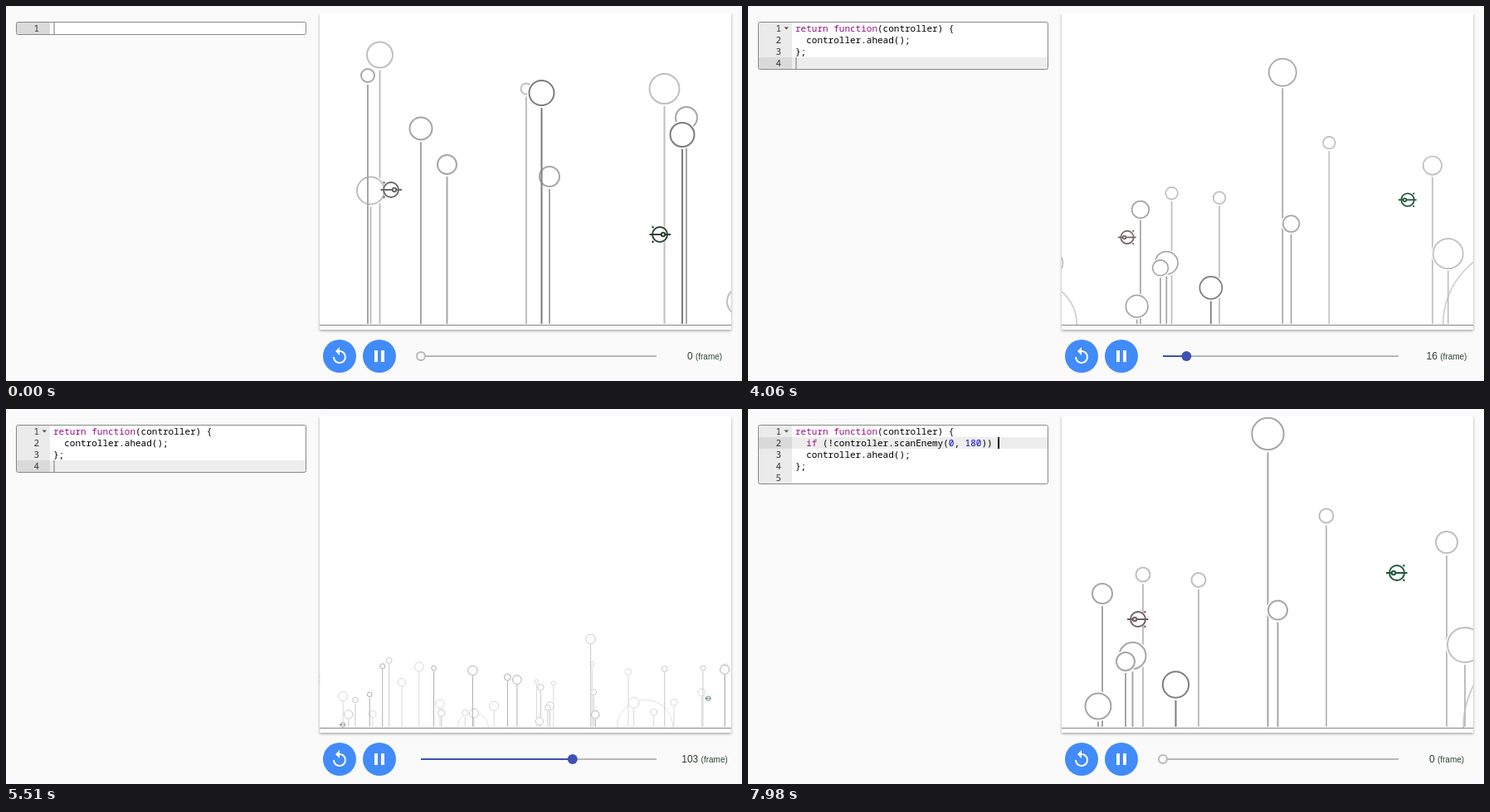
Recreate the animation shown at these times as an HTML page with a canvas. Size 887 px wide and 453 px high, loop 8000 ms.

```html
<!DOCTYPE html>
<html lang="en">
<head>
<meta charset="utf-8">
<title>Code battle</title>
<style>
  html, body { margin: 0; width: 100%; height: 100%; overflow: hidden; background: #fafafa; }
  canvas { display: block; }
</style>
</head>
<body>
<canvas id="stage" width="887" height="453"></canvas>
<script>
const ctx = document.getElementById('stage').getContext('2d');
const LOOP = 8000, SWITCH = 3410, PLAY = 3778, END = 6445;
const MONO = '11px "Noto Sans Mono", monospace';
const FIELD = { x: 378, y: 8, w: 496, h: 383, centre: 626, ground: 385 };
const ICONS = {
  replay: new Path2D('M12 5V1L7 6l5 5V7c3.31 0 6 2.69 6 6s-2.69 6-6 6-6-2.69-6-6H4c0 4.42 3.58 8 8 8s8-3.58 8-8-3.58-8-8-8z'),
  pause: new Path2D('M6 19h4V5H6v14zm8-14v14h4V5h-4z'),
  play: new Path2D('M8 5v14l11-7z')
};

// Parallax layers, back to front
const LAYERS = [
  { depth: 1 / 4, colour: '#bfbfbf', gap: 105 },
  { depth: 1 / 3, colour: '#a6a6a6', gap: 135 },
  { depth: 1 / 2, colour: '#7c7c7c', gap: 130 }
];

// Trees of the opening views, per layer: [x, height, radius]
const firstForest = {
  domes: [],
  trees: [
    [[450.5, 326, 16.5], [439.5, 162, 17.5], [627, 285, 7.5], [793.5, 285, 19], [886, 28, 18]],
    [[436, 301, 9], [500, 237, 14.5], [531.5, 193.5, 12.5], [655, 179, 13], [820, 250, 14]],
    [[645.5, 280, 16], [815, 229.5, 15.5]]
  ]
};
const secondForest = {
  domes: [[286, 62], [974, 112]],
  trees: [
    [[697, 256, 9.5], [842, 224, 14], [476, 185, 9.5], [543, 178.5, 9.5], [864, 100, 22]],
    [[626.5, 355, 20.2], [427, 162, 13], [638.5, 142, 12.5], [463.5, 87, 17], [455, 80, 12], [422, 26, 16.5]],
    [[515.5, 52, 16.7]]
  ]
};

let seed = 7;
function random() {
  seed = seed * 16807 % 2147483647;
  return seed / 2147483647;
}

// Trees beyond the opening view, revealed as the camera zooms out
secondForest.trees.forEach((trees, i) => {
  const { gap } = LAYERS[i];
  for (let start = -1000; start < 1350; start += gap) {
    const x = start + gap * random();
    const height = 40 + 230 * random() ** 1.3, radius = 10 + 10 * random();
    if (x < 310 || x > 920) trees.push([x, height, radius]);
  }
});

// Flight rules by tick: half the distance between ships, camera travel, altitudes
const spreadAt = n => 156 + 6.5 * (n - 14.6 * (1 - Math.exp(-n / 14.6)));
const cameraAt = n => n * (7.6 - 4.2 * Math.exp(-((n / 45) ** 2)));
const diveAt = n => Math.max(12, 131 - .0316 * n * n);
const glideAt = n => 117 + 70 * Math.exp(-((n / 38) ** 2));

// Keystrokes with [time, number of keys pressed]
const KEYS = 'return function(controller) {\ncontroller.ahead();↓;\n'
  + '↑↑↑\nif (!controller.scanEnemy(0, 180)) ';
const pace = [[0, 0], [870, 1], [1860, 27], [2990, 52], [6500, 53], [7080, 61], [7980, 91], [LOOP, 91]];

function keysAt(t) {
  const i = pace.findIndex(p => p[0] > t);
  const [t0, n0] = pace[i - 1], [t1, n1] = pace[i];
  return Math.floor(n0 + (n1 - n0) * (t - t0) / (t1 - t0));
}

// Small editor with bracket closing and auto indent
function typeKeys(count) {
  let before = '', after = '';
  for (const key of KEYS.slice(0, count)) {
    if (key === '↓') {
      before += after;
      after = '';
    } else if (key === '↑') {
      const cut = before.lastIndexOf('\n');
      after = before.slice(cut) + after;
      before = before.slice(0, cut);
    } else if (key === '\n') {
      const opened = before.endsWith('{');
      if (opened && after[0] === '}') after = '\n' + after;
      before += opened ? '\n  ' : '\n';
    } else if (key === ')' && after[0] === ')') {
      before += key;
      after = after.slice(1);
    } else {
      before += key;
      if (key === '(') after = ')' + after;
      if (key === '{') after = '}' + after;
    }
  }
  return { before, after };
}

function rect(x, y, w, h, colour) {
  ctx.fillStyle = colour;
  ctx.fillRect(x, y, w, h);
}

function line(x1, y1, x2, y2) {
  ctx.beginPath();
  ctx.moveTo(x1, y1);
  ctx.lineTo(x2, y2);
  ctx.stroke();
}

function disc(x, y, r, colour) {
  ctx.beginPath();
  ctx.arc(x, y, r, 0, 7);
  ctx.fillStyle = colour;
  ctx.fill();
}

function ring(x, y, r, from = 0) {
  ctx.beginPath();
  ctx.arc(x, y, r, from, 2 * Math.PI);
  ctx.stroke();
}

function text(str, x, y, colour, font, align = 'left') {
  ctx.fillStyle = colour;
  ctx.font = font;
  ctx.textAlign = align;
  ctx.fillText(str, x, y);
}

function drawCode(str, y, cell) {
  for (const m of str.matchAll(/\w+|[^\w\s]+/g)) {
    const colour = /^(return|function|if)$/.test(m[0]) ? '#930f80'
      : /^\d/.test(m[0]) ? '#0000cd' : '#000';
    text(m[0], 57 + m.index * cell, y, colour, MONO);
  }
}

function drawEditor(t) {
  const { before, after } = typeKeys(keysAt(t));
  const lines = (before + after).split('\n');
  const head = before.split('\n');
  const row = head.length - 1;
  const height = 14 * lines.length;
  const focused = t >= 680 && t < SWITCH || t >= 6500;
  ctx.font = MONO;
  const cell = ctx.measureText('0').width;

  rect(13, 20, 348, height, '#fff');
  rect(13, 20, 40, height, '#ebebeb');
  rect(13, 20 + 14 * row, 40, 14, '#dadada');
  if (lines.length > 1) rect(53, 20 + 14 * row, 308, 14, '#ededed');
  lines.forEach((str, i) => {
    const y = 31 + 14 * i;
    text(i + 1, 40, y, '#333', MONO, 'right');
    drawCode(str, y, cell);
  });
  if (lines.length === 1 && t >= 1400) {
    text('i', 21, 31, '#333', 'italic bold 11px "Liberation Serif", serif');
  }
  if (lines.length > 1) {
    ctx.fillStyle = '#555';
    ctx.fill(new Path2D('M43.5 25.5h5.5l-2.75 3z'));
  }
  const x = Math.floor(57 + head[row].length * cell);
  if (focused) rect(x, 20 + 14 * row, 2, 14, '#000');
  else rect(x + .5, 20 + 14 * row, 1, 14, '#777');

  ctx.strokeStyle = '#888';
  ctx.lineWidth = 1;
  ctx.beginPath();
  ctx.roundRect(12.5, 19.5, 349, height + 1, 2);
  ctx.stroke();
}

function drawShip(x, y, face, scale, colour) {
  ctx.save();
  ctx.translate(x, y);
  ctx.scale(face * scale, scale);
  disc(0, 0, 10, '#fff');
  ctx.strokeStyle = colour;
  ctx.lineWidth = 2;
  ring(0, 0, 9);
  ring(4, 0, 2.2);
  line(-12.5, 0, 1.5, 0);
  line(6.5, 0, 13, 0);
  line(-7.5, -8, -9.3, -9.8);
  line(-7.5, 8, -9.3, 9.8);
  ctx.restore();
}

function drawField({ domes, trees }, { scale, camera, spread, heights, face, inks }) {
  const { x, y, w, h, centre, ground } = FIELD;
  const project = (px, depth) => centre + scale * (px - centre + camera * depth);
  ctx.save();
  ctx.shadowColor = 'rgba(0,0,0,.35)';
  ctx.shadowBlur = 3;
  ctx.shadowOffsetY = 1.5;
  rect(x, y, w, h, '#fff');
  ctx.restore();

  ctx.save();
  ctx.beginPath();
  ctx.rect(x, y, w, h);
  ctx.clip();
  ctx.lineWidth = 2 * scale;
  ctx.strokeStyle = '#cfcfcf';
  for (const [px, r] of domes) ring(project(px, 1 / 6), ground, r * scale, Math.PI);
  LAYERS.forEach(({ depth, colour }, i) => {
    ctx.strokeStyle = colour;
    for (const [px, height, r] of trees[i]) {
      const tx = project(px, depth), ty = ground - height * scale;
      const trunk = ty + (r + 2) * scale;
      disc(tx, ty, (r + 1.5) * scale, '#fff');
      ring(tx, ty, (r - 1) * scale);
      if (trunk < 384) line(tx, trunk, tx, 384);
    }
  });
  [-1, 1].forEach((side, i) => {
    drawShip(centre + side * spread * scale, ground - heights[i] * scale, face, scale, inks[i]);
  });
  rect(x, ground, w, 1, '#858585');
  ctx.restore();
}

function drawButton(x, icon) {
  disc(x, 423, 20, '#428bfa');
  ctx.save();
  ctx.translate(x - 12, 411);
  ctx.fillStyle = '#fff';
  ctx.fill(ICONS[icon]);
  ctx.restore();
}

function drawControls(tick, icon, ink) {
  drawButton(402, 'replay');
  drawButton(450, icon);

  const thumb = 500 + tick * 284 / 160;
  rect(500, 422, 284, 2, '#b8b8b8');
  if (tick > 0) {
    rect(500, 422, thumb - 500, 2, '#3f51b5');
    disc(thumb, 423, 6, '#3f51b5');
  } else {
    disc(500, 423, 6, '#fafafa');
    ctx.strokeStyle = '#b8b8b8';
    ctx.lineWidth = 2;
    ring(500, 423, 5);
  }

  const big = '12px "Liberation Sans", sans-serif', small = '10px "Liberation Sans", sans-serif';
  ctx.font = big;
  const numberWidth = ctx.measureText(tick + ' ').width;
  ctx.font = small;
  const left = 842 - (numberWidth + ctx.measureText('(frame)').width) / 2;
  text(tick, left, 427, '#333c33', big);
  text('(frame)', left + numberWidth, 427, ink, small);
}

function draw(t) {
  const first = t < SWITCH;
  const waiting = !first && t < PLAY;
  const tick = t >= PLAY && t < END ? Math.floor((t - PLAY) * .06) : 0;
  const green = waiting ? '#2b8a35' : first ? '#2c4532' : '#23583a';

  rect(0, 0, 887, 453, '#fafafa');
  drawEditor(t);
  if (first) {
    drawField(firstForest, {
      scale: 1, camera: 0, spread: 162, heights: [163, 109], face: 1, inks: ['#6c6c6c', green]
    });
  } else {
    const spread = spreadAt(tick);
    // The view zooms out to keep both ships in sight.
    drawField(secondForest, {
      scale: 248 / (spread + 92), camera: cameraAt(tick), spread,
      heights: [diveAt(tick), glideAt(tick)], face: -1, inks: ['#736164', green]
    });
  }
  drawControls(tick, waiting ? 'play' : 'pause', waiting ? '#2f7d32' : '#2c4832');
}

const start = performance.now();
function loop() {
  draw((performance.now() - start) % LOOP);
  requestAnimationFrame(loop);
}
loop();
</script>
</body>
</html>
```
